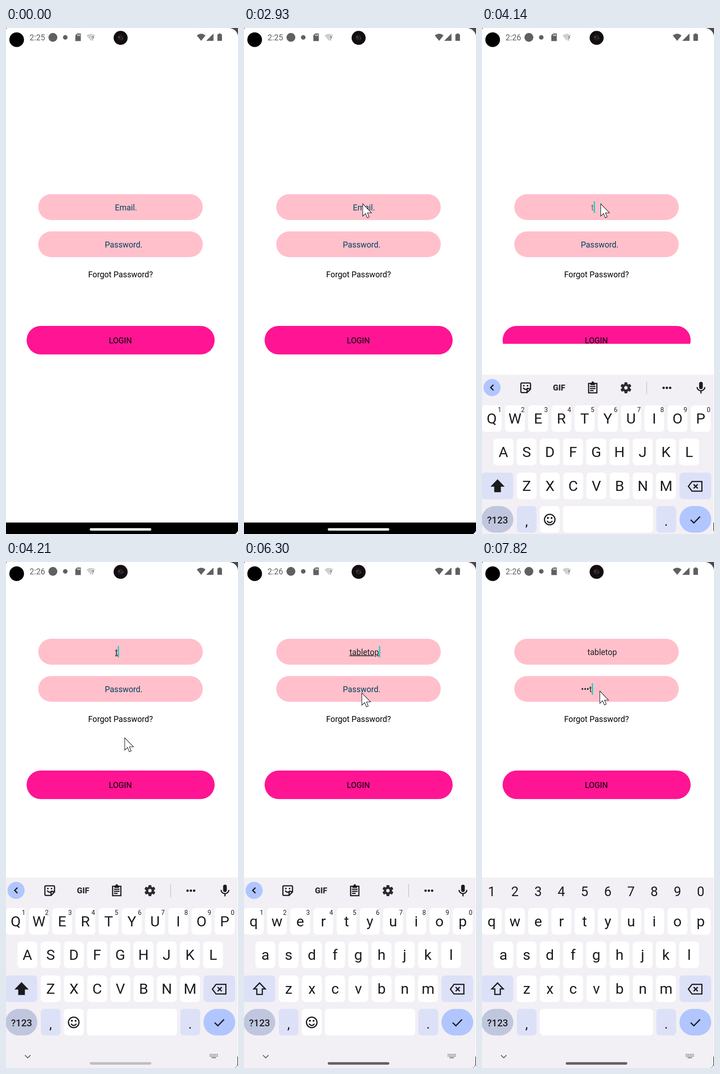
Recreate the animation shown at these times as an HTML page. Size 507x1104 px, loop 8000 ms.

```html
<!DOCTYPE html>
<html lang="en">
<head>
<meta charset="utf-8">
<title>Login form</title>
<style>
  html, body { margin: 0; width: 100%; height: 100%; overflow: hidden; background: #4a4a4c; }
  svg { display: block; width: 100%; height: 100%; }
  text { font-family: Roboto, sans-serif; font-size: 17.6px; white-space: pre; }
  .mid { text-anchor: middle; }
  .hint { fill: #003f5c; }
  .typed { fill: #202024; text-decoration-skip-ink: none; }
  .key { font-size: 32px; fill: #1b1b1f; }
  .line { fill: none; stroke: #1b1b1f; stroke-width: 2.6; }
</style>
</head>
<body>
<svg viewBox="0 0 507 1104" preserveAspectRatio="none">
  <path fill="#fff" d="M2 0H489Q504 3 507 17V1104H0V3Z"/>

  <g id="form">
    <rect x="70.5" y="362.5" width="359.5" height="56.5" rx="28.2" fill="#ffc0cb"/>
    <rect x="70.5" y="443.8" width="359.5" height="56.2" rx="28.1" fill="#ffc0cb"/>
    <text id="emailHint" class="hint" x="238" y="397.6">Email.</text>
    <text id="email" class="typed" y="397.6"><tspan id="marked" text-decoration="underline"></tspan><tspan id="plain"></tspan></text>
    <text id="passHint" class="hint" x="216" y="478.8">Password.</text>
    <text id="pass" class="typed" x="216.5" y="478.8"></text>
    <text class="mid" x="250.3" y="543.8">Forgot Password?</text>
    <rect x="45" y="650" width="411" height="62.3" rx="31.1" fill="#ff1493"/>
    <text class="mid" x="250" y="688">LOGIN</text>
    <rect id="caret" width="2.8" height="25" fill="#20cfbf"/>
  </g>
  <rect id="cover" y="689" width="507" height="390" fill="#fff"/>

  <path d="M0 1079H507V1097Q505 1101 501 1104H0Z"/>
  <rect x="183" y="1091.3" width="134.5" height="5.4" rx="2.7" fill="#f1f1f1"/>

  <g id="keyboard">
    <path fill="#f2f0f5" d="M0 688.5H506V1096Q505 1101 500 1104H0Z"/>
    <g id="keys"></g>
    <g id="tools">
      <circle cx="22" cy="716.5" r="18.7" fill="#b1c5ff"/>
      <path class="line" d="M25 710.5L19 716.5L25 722.5"/>
      <path class="line" d="M87 706.5H104Q106 706.5 106 709V720L98.500 727.500H87Q85 727.500 85 725V709Q85 706.500 87 706.500ZM90 717Q95 724 101 717M106 719H98.500V727"/>
      <path fill="#1b1b1f" d="M90 711h3v3h-3zM98 711h3v3h-3z"/>
      <text class="mid" x="168.500" y="723" style="font-weight:900" fill="#303036">GIF</text>
      <path class="line" d="M233 707.500H251V728H233ZM236 714H248M236 718.500H248M236 723H244"/>
      <path fill="#1b1b1f" d="M237 706H247V711H237ZM239.500 706a2.500 3 0 0 1 5 0Z"/>
      <g id="gear" transform="translate(314.500 717)" fill="#2a2a2f"></g>
      <path stroke="#c6c5cb" stroke-width="1.500" d="M359.800 703V731"/>
      <g fill="#1b1b1f"><circle cx="396.800" cy="717" r="2.600"/><circle cx="404" cy="717" r="2.600"/><circle cx="411.200" cy="717" r="2.600"/></g>
      <rect x="474.500" y="704" width="8" height="16" rx="4" fill="#1b1b1f"/>
      <path class="line" d="M470 715.500a8.500 8 0 0 0 17 0M478.500 723.500V729.500"/>
    </g>
    <g id="digits"></g>
    <path id="shift" class="line" d="M34 918.500L46.500 931.500H40V943.500H28V931.500H21.500Z"/>
    <path class="line" d="M459 921.500H480.500V942.500H459L451 932ZM462.500 927.500L471.500 936.500M471.500 927.500L462.500 936.500"/>
    <path class="line" d="M456 1005L463 1012L476.500 998"/>
    <g id="emoji">
      <circle class="line" cx="148" cy="1004.500" r="11.500"/>
      <path class="line" d="M142 1007.500Q148 1015 154 1007.500"/>
      <circle cx="144" cy="1001" r="2"/><circle cx="152" cy="1001" r="2"/>
    </g>
    <path d="M41.500 1076L47.500 1082L53.500 1076" fill="none" stroke="#606066" stroke-width="1.800"/>
    <path d="M445 1074.500H463M445 1078H463" stroke="#707076" stroke-width="2" stroke-dasharray="2 1.200"/>
    <path d="M449 1081.500H459" stroke="#707076" stroke-width="2"/>
    <rect id="handle" x="183" y="1091.300" width="134.500" height="5.400" rx="2.700"/>
  </g>

  <g fill="#606062">
    <circle cx="23.300" cy="25.500" r="16" fill="#000"/>
    <text id="clock" x="51.500" y="27.300"></text>
    <circle cx="102.500" cy="20.500" r="9.700"/>
    <circle cx="129.500" cy="20.500" r="5"/>
    <path d="M155.500 12H163.500V28.500H151.500V16Z"/>
    <path stroke="#fff" stroke-width="1.300" d="M156.300 14V17.500M158.800 14V17.500M161.300 14V17.500"/>
    <path fill="#cfcfd0" d="M176 16.500Q185.500 9 195 16.500L185.500 28Z"/>
    <text x="186.500" y="27" stroke="#fff" stroke-width="2" paint-order="stroke" style="font-size:12px;font-weight:700">?</text>
    <circle cx="250.500" cy="21.500" r="15.300" fill="#110d10"/>
    <circle cx="250" cy="21" r="6.500" fill="#251d22"/>
    <circle cx="247" cy="20" r="1.300" fill="#74666c"/><circle cx="255" cy="23" r="1" fill="#74666c"/>
    <path d="M417 16.500Q426.500 8.500 436 16.500L426.500 28ZM453.500 12V28H437.500ZM464.500 13.800V12H469.500V13.800H472V28H462V13.800Z"/>
  </g>

  <path id="pointer" fill="#fff" stroke="#17171b" stroke-width="1.100" d="M.5 .5V27.500L6.500 21.800L10.500 31L14.500 29.300L10.700 20.200H19.500Z"/>
</svg>

<script>
const $ = id => document.getElementById(id);
const NS = "http://www.w3.org/2000/svg";
const PITCH = 50.75, ROWS = [755, 828, 902, 975];

function add(parent, tag, attrs, text = "") {
  const node = document.createElementNS(NS, tag);
  for (const name in attrs) node.setAttribute(name, attrs[name]);
  node.textContent = text;
  return parent.appendChild(node);
}
const show = (id, on) => $(id).style.display = on ? "" : "none";

// Keyboard
const keys = $("keys"), letters = [];
const addKey = (x, row, width, fill = "#fff", rx = 8) =>
  add(keys, "rect", { x, y: ROWS[row], width, height: 58, rx, fill });
const addLabel = (parent, text, x, y, size = 32) =>
  add(parent, "text", { class: "key mid", x, y, style: `font-size:${size}px` }, text);

["qwertyuiop", "asdfghjkl", "zxcvbnm"].forEach((chars, row) => {
  [...chars].forEach((char, i) => {
    const x = [-0.5, 25, 76][row] + PITCH * i;
    addKey(x, row, 43.3);
    letters.push([char, addLabel(keys, char, x + 21.7, ROWS[row] + 40)]);
  });
});
[..."1234567890"].forEach((digit, i) => {
  addLabel($("tools"), digit, 38.5 + PITCH * i, 770, 14);
  addLabel($("digits"), digit, 21.2 + PITCH * i, 728.5, 29);
});
addKey(-2, 2, 70.5, "#dde1f8");
addKey(431.5, 2, 69.5, "#dde1f8");
addKey(-1, 3, 69.5, "#c0c6dd", 29);
addKey(76, 3, 43.3, "#dde1f8");
const emojiKey = addKey(126.5, 3, 43.3);
const spaceKey = addKey(177, 3, 197);
addKey(381, 3, 43.3, "#dde1f8");
addKey(431.5, 3, 69.5, "#b1c5ff", 29);
addLabel(keys, "?123", 34, 1013, 21).style.fontWeight = 500;
addLabel(keys, ",", 97.5, 1018, 30);
addLabel(keys, ".", 402.5, 1018, 30);

for (let a = 0; a < 360; a += 60)
  add($("gear"), "rect", { x: -3.2, y: -12, width: 6.4, height: 8, rx: 1, transform: `rotate(${a})` });
add($("gear"), "circle", { r: 9 });
add($("gear"), "circle", { r: 3.7, fill: "#f2f0f5" });

// Timeline: each row is [start, ...state], held until the next row
const LOOP = 8000;
const USER = "tabletop";
const emailSteps = [[0, 0, 0], [4140, 1, 0], [4210, 1, 1], [4730, 2, 1], [4800, 3, 2], [4950, 3, 3],
  [5010, 4, 3], [5220, 5, 3], [5430, 6, 3], [5560, 7, 3], [5640, 8, 3], [6300, 8, 8], [6630, 8, 0]];
const passSteps = [[0, ""], [7560, "t"], [7620, "•e"], [7760, "••s"], [7820, "•••t"]];
const caretSteps = [[0, ""], [1330, "email"], [1920, ""], [2470, "email"], [2930, ""], [3470, "email"],
  [4000, ""], [4140, "email"], [6630, "pass"], [7230, ""], [7560, "pass"]];
const handleSteps = [[0, 190], [4730, 178], [4800, 170], [4950, 160], [5010, 152], [5220, 141],
  [5290, 132], [5430, 118], [5560, 104], [5640, 97]];
const pointerSteps = [[990, 262, 395], [1060, 266, 360], [1130, 262, 383], [1520, 259, 383],
  [6170, 257, 288], [6300, 257, 285], [6370, 257, 283], [6440, 257, 281]];

const at = (steps, t) => steps.findLast(step => step[0] <= t);

// Stepped, decelerating travel between two points
function travel(t, start, end, count, from, to, bend) {
  const p = Math.floor((t - start) / (end - start) * count) / count;
  const ease = 1 - (1 - p) ** 1.3;
  return [from[0] + (to[0] - from[0]) * ease - bend * 4 * ease * (1 - ease),
          from[1] + (to[1] - from[1]) * ease];
}
function pointerAt(t) {
  if (t < 990) return travel(t, 240, 990, 10, [454, 1036], [262, 395], 22);
  if (t >= 5740 && t < 6170) return travel(t, 5740, 6170, 6, [259, 383], [257, 288], 0);
  return at(pointerSteps, t).slice(1);
}

function draw(t) {
  const [, count, marked] = at(emailSteps, t);
  const [, password] = at(passSteps, t);
  const [, focus] = at(caretSteps, t);
  const raised = t >= 4210, numeric = t >= 6970, upper = t < 4400;

  $("clock").textContent = t < 3340 ? "2:25" : "2:26";
  $("form").setAttribute("transform", `translate(0 ${raised ? -195 : 0})`);
  show("cover", t >= 4000 && !raised);

  $("marked").textContent = USER.slice(0, marked);
  $("plain").textContent = USER.slice(marked, count);
  $("email").style.fill = raised ? "" : "#666";
  const width = count ? $("email").getComputedTextLength() : 0;
  const left = 262.7 - Math.max(48.5, width) / 2;
  $("email").setAttribute("x", left);
  show("emailHint", !count);

  $("pass").textContent = password;
  show("passHint", !password);
  const passWidth = password ? $("pass").getComputedTextLength() : 0;

  show("caret", focus);
  $("caret").setAttribute("x", focus === "pass" ? 216.3 + passWidth : left + width);
  $("caret").setAttribute("y", focus === "pass" ? 459.5 : 378.3);

  show("keyboard", t >= 4140);
  $("keyboard").setAttribute("transform", `translate(0 ${raised ? 0 : 68})`);
  for (const [char, label] of letters) label.textContent = upper ? char.toUpperCase() : char;
  $("shift").style.fill = upper ? "#1b1b1f" : "none";
  show("tools", !numeric);
  show("digits", numeric);
  show("emoji", !numeric);
  emojiKey.style.display = numeric ? "none" : "";
  spaceKey.setAttribute("x", numeric ? 126.5 : 177);
  spaceKey.setAttribute("width", numeric ? 247.5 : 197);
  const grey = at(handleSteps, t)[1];
  $("handle").setAttribute("fill", `rgb(${grey},${grey},${grey + 2})`);

  show("pointer", t >= 240);
  if (t >= 240) $("pointer").setAttribute("transform", `translate(${pointerAt(t)})`);
}

const begin = performance.now();
function tick() {
  draw((performance.now() - begin) % LOOP);
  requestAnimationFrame(tick);
}
tick();
</script>
</body>
</html>
```
